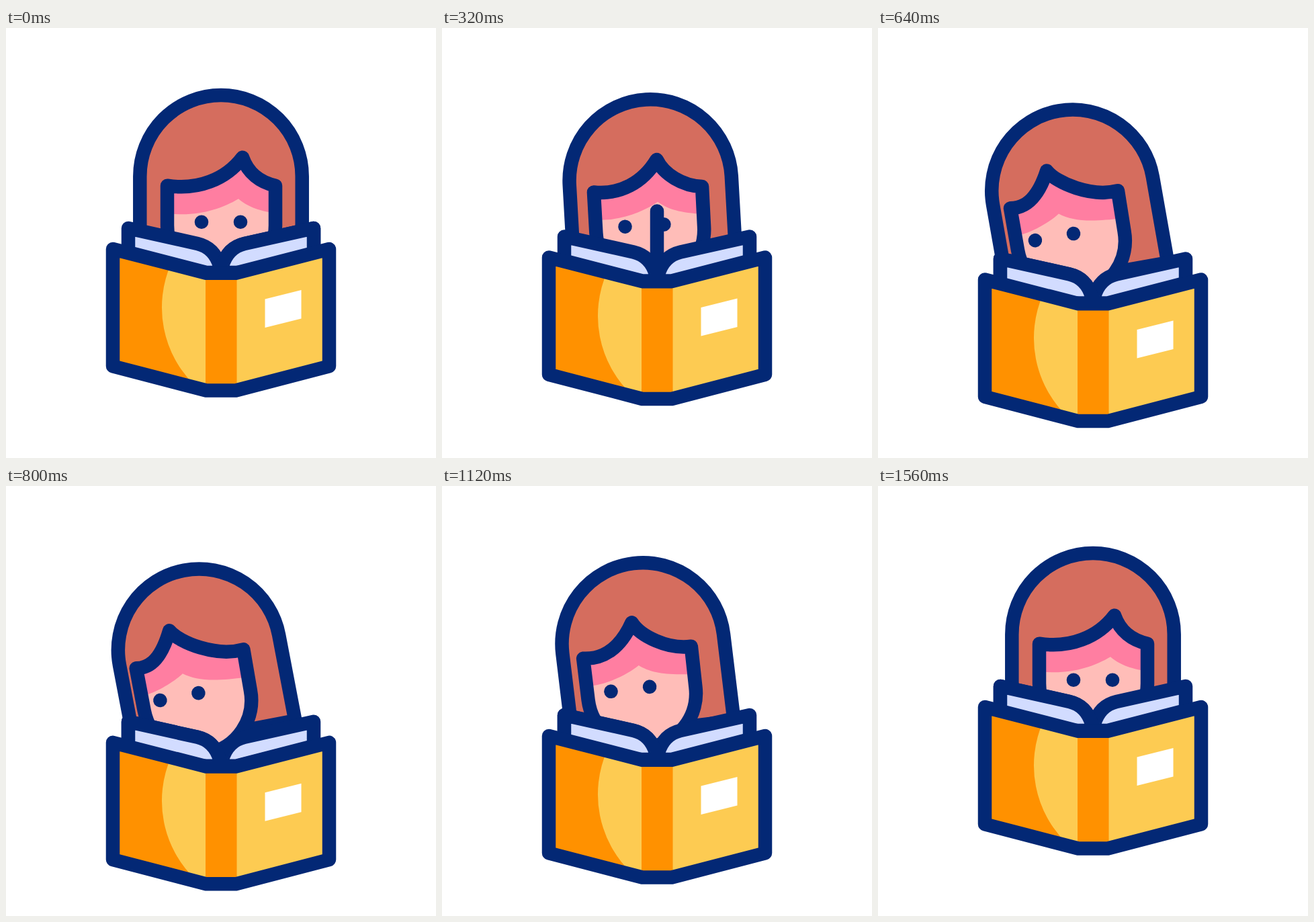
An HTML page for the animation above (2.1 s loop, 640x640 px).

```html
<!DOCTYPE html>
<html lang="en">
<head>
<meta charset="utf-8">
<title>Reading</title>
<style>
  html, body { margin: 0; height: 100%; overflow: hidden; background: #fff; }
  svg { display: block; width: 100vw; height: 100vh; }
  .line { stroke: #032875; stroke-width: 20.5; stroke-linejoin: round; stroke-linecap: round; }
  .navy { fill: #032875; }
  .hair { fill: #d56d5e; }
  .skin { fill: #ffbdb8; }
  .shade { fill: #ff7ea1; }
  .paper { fill: #d2dcff; }
  .yellow { fill: #fdcb52; }
  .orange { fill: #ff9100; }
</style>
</head>
<body>
<svg viewBox="0 0 640 640">
  <g id="head">
    <path class="hair line" d="M-120.7 130V0A120.7 120.7 0 0 1 120.7 0V130Z"/>
    <path class="skin" id="face"/>
    <path class="shade" id="shadow"/>
    <path class="line" id="outline" fill="none"/>
    <g class="navy" id="eyes"><circle cx="-29" cy="68" r="10.3"/><circle cx="29" cy="68" r="10.3"/></g>
  </g>
  <g id="book">
    <path class="paper line" id="page" d="M182 334V298L285 321C302 325 313 337 318 354V364H298Z"/>
    <use href="#page" transform="matrix(-1 0 0 1 640 0)"/>
    <path class="paper line" id="flip"/>
    <path class="yellow" id="cover" d="M159 329L298 364.7H342L481 329V503.3L342 539.5H298L159 503.3Z"/>
    <path class="orange" d="M159 329L246 350A162 162 0 0 0 282 533L159 503ZM297 365H343.5V539H297Z"/>
    <path fill="#fff" d="M385.5 403.5L439.5 390V432.5L385.5 446Z"/>
    <path class="line" id="rim" fill="none"/>
  </g>
</svg>
<script>
const LOOP = 2100;
const $ = id => document.getElementById(id);
const set = (id, name, value) => $(id).setAttribute(name, value);

// Each pair holds the upright and the leaning shape.
const FACE = [
  'M-80 14C-35 21 7 5 32 -28C40 -5 58 9 81 14L81 73A80.5 80.5 0 0 1 -80 73Z',
  'M-96 9.5C-71.5 13.8 -51.6 -1 -33 -36C-21.7 -15 25.8 14.7 66 11.6L65 73A80.5 80.5 0 0 1 -96 73Z'
];
const BROW = [
  'M-80 14C-35 21 7 5 32 -28C40 -5 58 9 81 14L81 55C54 51 38 44 26 33.5C0 49 -38 61 -80 55Z',
  'M-96 9.5C-71.5 13.8 -51.6 -1 -33 -36C-21.7 -15 25.8 14.7 66 11.6L66 53C16.5 50.6 -7.8 44.3 -26.6 30C-39.3 38.8 -75 53 -96 51Z'
];

function morph([from, to], q) {
  const number = /-?\d+(\.\d+)?/g;
  const ends = to.match(number);
  let i = 0;
  return from.replace(number, n => +n + (ends[i++] - n) * q);
}

// Symmetric cubic-bezier(.5, 0, .5, 1)
function ease(u) {
  if (u <= 0) return 0;
  if (u >= 1) return 1;
  let lo = 0, hi = 1, s;
  for (let i = 0; i < 24; i++) {
    s = (lo + hi) / 2;
    if (1.5 * s * (1 - s) + s ** 3 < u) lo = s; else hi = s;
  }
  return s * s * (3 - 2 * s);
}

const swing = (t, peak, end) =>
  t < peak ? ease(t / peak) : 1 - ease((t - peak) / (end - peak));

function flipPath(t) {
  const k = 1 - 2 * ease((t - 10) / 622);
  const lift = 38 * Math.sqrt(Math.max(0, 1 - k * k));
  const x = d => 320 + d * k;
  return `M${x(138)} 364V${298 - lift}L${x(35)} ${321 - lift * .4}` +
    `C${x(18)} ${325 - lift * .2} ${x(7)} 337 ${x(2)} 354V364Z`;
}

function draw(t) {
  const lean = 1.08 * swing(t, 815, 1528);
  const face = morph(FACE, lean);
  set('head', 'transform',
    `translate(0 ${18.9 * lean}) rotate(${-10 * lean} 320 394) translate(320 220.7)`);
  set('face', 'd', face);
  set('outline', 'd', face);
  set('shadow', 'd', morph(BROW, lean));
  set('eyes', 'transform', `translate(${-39 * lean} ${-5 * lean})`);
  set('book', 'transform', `translate(0 ${54 * swing(t, 912, 1540)})`);
  set('flip', 'd', flipPath(t));
}

set('rim', 'd', $('cover').getAttribute('d'));
const start = performance.now();
function tick() {
  draw((performance.now() - start) % LOOP);
  requestAnimationFrame(tick);
}
tick();
</script>
</body>
</html>
```
